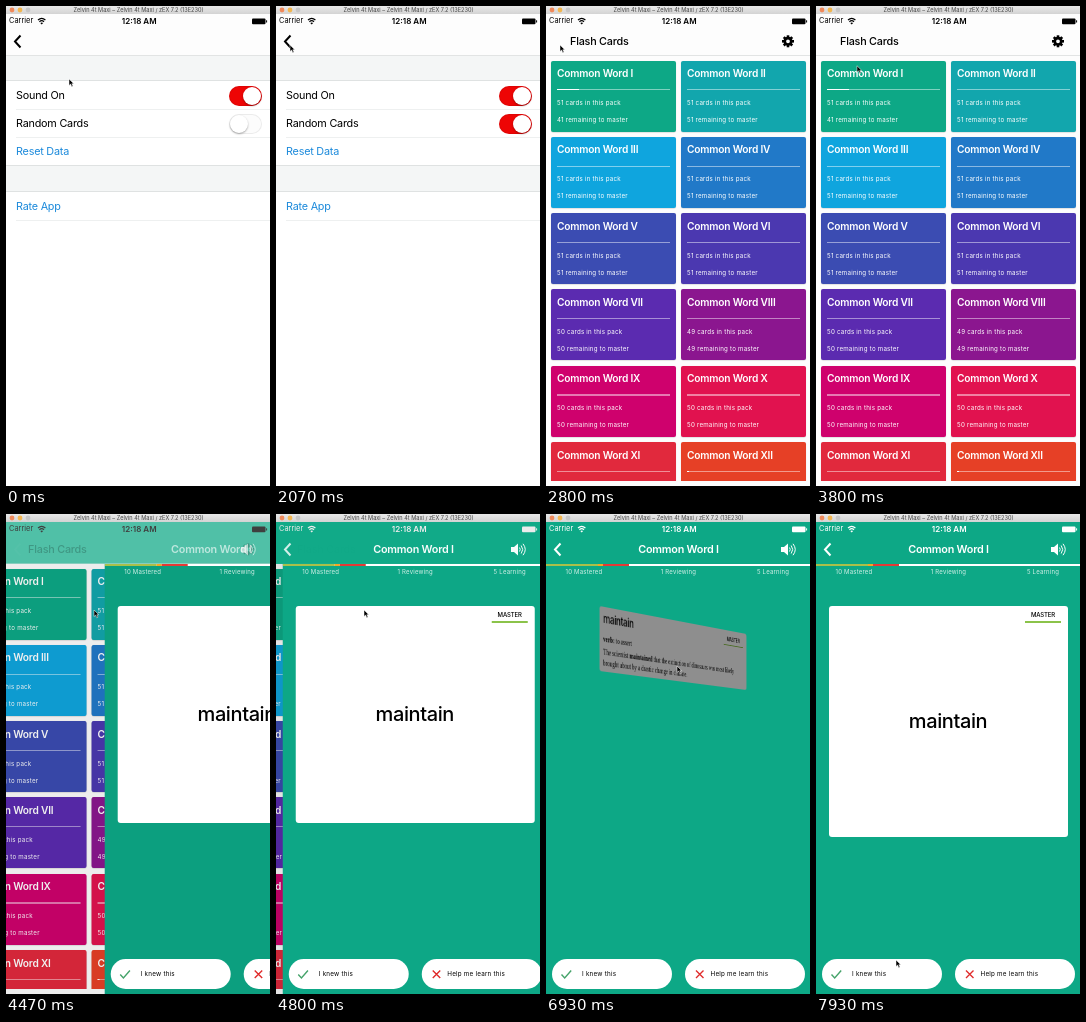
These frames come from a looping animation (264 px wide and 480 px high, 8000 ms). An HTML page:

```html
<!DOCTYPE html>
<html lang="en">
<head>
<meta charset="utf-8">
<title>Flash Cards</title>
<style>
html, body { margin: 0; width: 100%; height: 100%; overflow: hidden; background: #fff; }
#stage { position: relative; width: 264px; height: 480px; overflow: hidden; font-family: Inter, Roboto, sans-serif; color: #000; }
#stage div, #stage svg, b { position: absolute; }
svg { left: 0; top: 0; overflow: visible; fill: none; }
b { font-weight: 400; line-height: 0; white-space: nowrap; letter-spacing: -.02em; }
.mid { transform: translateX(-50%); }
.view { left: 0; top: 0; width: 264px; height: 480px; overflow: hidden; }
.small { letter-spacing: .035em; }
.serif { font-family: "Liberation Serif", serif; letter-spacing: 0; }
#scene { inset: 0; perspective: 1110px; perspective-origin: 132px 294px; }
.face { left: 12.5px; top: 91.5px; width: 239px; background: #fff; border-radius: 3px; }
</style>
</head>
<body>
<div id="stage"></div>
<script>
const TEAL = [13, 168, 134], LINK = '#1c8adb', GREEN = '#8bc34a';
const W = 264, LOOP = 8000;

const text = (x, y, size, s, css = '', cls = '') =>
  `<b class="${cls}" style="left:${x}px;top:${y}px;font-size:${size}px;${css}">${s}</b>`;
const box = (x, y, w, h, bg, css = '', inner = '') =>
  `<div style="left:${x}px;top:${y}px;width:${w}px;height:${h}px;background:${bg};${css}">${inner}</div>`;
const svg = (inner, attrs = '') => `<svg width="264" height="480" ${attrs}>${inner}</svg>`;
const chevron = (id, color) =>
  svg('<path d="M14.5 29.5L9 35.5l5.5 6"/>', `id="${id}" stroke="${color}" stroke-width="2"`);

function settings() {
  const row = (y, s, color) => text(10, y, 10.8, s, `color:${color}`);
  const line = y => box(10, y, 254, 1, '#eef0f0');
  const band = (y, h) => box(0, y, W, h, '#f4f6f6', 'box-sizing:border-box;border:solid #dfe2e2;border-width:1px 0');
  const toggle = (y, id) => box(223, y, 33, 20, '#ee0505', 'border-radius:10px;box-shadow:inset 0 0 0 1px #0001',
    box(14, 1, 18, 18, '#fff', 'border-radius:9px;box-shadow:0 1px 2px #0005')).replace('<div', `<div id="${id}"`);
  return band(49, 26) + band(159, 27) + line(103) + line(131) + line(214) +
    row(90, 'Sound On', '#000') + row(118, 'Random Cards', '#000') +
    row(146, 'Reset Data', LINK) + row(200.5, 'Rate App', LINK) +
    toggle(79.5, 'sound') + toggle(107.5, 'random');
}

function home() {
  const numerals = 'I II III IV V VI VII VIII IX X XI XII'.split(' ');
  const colors = '#0da886 #12a6ad #0fa5de #2179c8 #3b4cb2 #4b38b0 #5b2bb0 #8b168f #cf016d #e1124f #e1293d #e64026'.split(' ');
  const sizes = { 6: 50, 7: 49, 8: 50, 9: 50 };
  const done = { 0: 22, 11: 2 };
  const cards = numerals.map((n, i) => {
    const total = sizes[i] || 51;
    return box(5 + i % 2 * 130, 54.5 + (i >> 1) * 76.3, 125, 71, colors[i], 'border-radius:2px;color:#fff;box-shadow:0 .5px 1px #0003',
      text(6, 12.5, 10.2, 'Common Word ' + n, 'font-weight:600') +
      box(6, 28.8, 113, 1.2, '#ffffff78') + box(6, 28.8, done[i] || 0, 1.2, '#fff') +
      text(6, 42.5, 6.2, total + ' cards in this pack', '', 'small') +
      text(6, 59.5, 6.2, total - (i ? 0 : 10) + ' remaining to master', '', 'small'));
  }).join('');
  return box(0, 0, W, 475, 'none', 'overflow:hidden', cards) +
    '<div id="dim" style="inset:0;background:#000"></div>';
}

function study() {
  const label = (x, s) => text(x, 58, 6, s, 'color:#d3f0e8', 'mid small');
  const pill = (x, inset, s, icon) => box(x, 445, 120, 29.5, '#fff', 'border-radius:15px',
    text(inset, 15.3, 6.3, s, '', 'small') + svg(icon, 'stroke-width="1.4"'));
  const master = text(214.5, 9.5, 6, 'MASTER', 'font-weight:500', 'mid') + box(196.5, 15.7, 36, 1.6, GREEN);
  return box(0, 49.5, W, 2, '#fff') + box(0, 49.5, 52, 2, '#a9c04a') +
    box(52, 49.5, 5, 2, '#f5a623') + box(57, 49.5, 26, 2, '#e53935') +
    label(38, '10 Mastered') + label(132.5, '1 Reviewing') + label(227, '5 Learning') +
    '<div id="scene"><div class="face" id="front">' + master +
    text(119.5, 0, 20, 'maintain', 'top:50%;font-weight:500', 'mid') +
    '</div><div class="face" id="back" style="height:65px">' + master +
    text(5, 11.5, 11.3, 'maintain', 'font-weight:500') +
    text(5, 32.5, 7.2, '<strong>verb:</strong> to assert', '', 'serif') +
    text(5, 45.5, 7.2, 'The scientist <strong>maintained</strong> that the extinction of dinosaurs was most likely', '', 'serif') +
    text(5, 56.5, 7.2, 'brought about by a drastic change in climate.', '', 'serif') +
    '</div></div>' +
    pill(6, 30, 'I knew this', '<path d="M9.5 15.5l3.2 3.5 6.5-7.5" stroke="#45a36a"/>') +
    pill(138.5, 26, 'Help me learn this', '<path d="M11 11.5l7.5 7.5m0-7.5l-7.5 7.5" stroke="#e02c2c"/>');
}

function chrome() {
  const device = 'Zelvin 4t Maxi';
  const teeth = [...Array(8)].map((_, i) => `<path d="M242 29.3v3" transform="rotate(${i * 45} 242 35.3)"/>`).join('');
  return '<div id="nav" style="left:0;top:8px;width:264px;height:42px"></div>' +
    '<div id="rule" style="left:0;top:49px;width:264px;height:1px;background:#e2e4e4"></div>' +
    chevron('backDark', '#000') + chevron('backLight', '#fff') +
    '<div id="homeNav" style="left:0;top:0">' + text(24, 36, 10.8, 'Flash Cards', 'font-weight:500') + '</div>' +
    svg(`<g stroke="#000" stroke-width="2.6">${teeth}<circle cx="242" cy="35.3" r="3.2"/></g>`, 'id="gear"') +
    '<div id="studyNav" style="left:0;top:0;color:#fff">' +
    text(132.5, 36, 10.8, 'Common Word I', 'font-weight:600', 'mid') + '</div>' +
    svg('<path d="M235 33h3l4-3.5v12l-4-3.5h-3z" fill="#fff"/><path d="M243.5 33.5q1.5 2 0 4m1.7-6q3 4 0 8m1.8-9.7q4.5 5.7 0 11.4" stroke="#fff"/>', 'id="speaker"') +
    '<div id="status" style="left:0;top:0">' + text(3, 15.1, 7.4, 'Carrier', 'letter-spacing:0') +
    text(133.2, 15.1, 8, '12:18 AM', 'font-weight:600;letter-spacing:0', 'mid') +
    svg('<path d="M32 14q3.7-3.4 7.4 0m-6 1.7q2.3-2 4.6 0" stroke="currentColor" stroke-width="1.2"/><path d="M34.3 17.1l1.4 1.4 1.4-1.4q-1.4-1-2.8 0z" fill="currentColor"/><rect x="246" y="12.5" width="13.5" height="5.8" rx="1" fill="currentColor"/><path d="M260.6 14.3v2.2" stroke="currentColor"/>') +
    '</div>' +
    box(0, 0, W, 8, 'linear-gradient(#e9e9e9,#d3d3d3)', '',
      svg('<circle cx="6" cy="4" r="2.4" fill="#f08a5c"/><circle cx="14" cy="4" r="2.4" fill="#f3b650"/><circle cx="22" cy="4" r="2.4" fill="#c6c6c6"/>') +
      text(132.5, 4.1, 5.6, `${device} – ${device} / zEX 7.2 (13E230)`, 'color:#444;letter-spacing:0', 'mid')) +
    svg('<path d="M0 0v6.5l1.6-1.4 1.2 2.6 1.2-.6-1.2-2.4h2z" fill="#000" stroke="#fff" stroke-width=".5"/>', 'id="cursor"');
}

const view = (id, bg, inner) => `<div class="view" id="${id}" style="background:${bg}">${inner}</div>`;
document.getElementById('stage').innerHTML = view('home', '#fdfdfd', home()) +
  view('settings', '#fff', settings()) + view('study', `rgb(${TEAL})`, study()) + chrome();

const ui = {};
document.querySelectorAll('#stage [id]').forEach(e => ui[e.id] = e);
const knob = ui.random.firstElementChild;

const ease = (t, start, length) => {
  const k = Math.min(1, Math.max(0, (t - start) / length));
  return (1 - Math.cos(Math.PI * k)) / 2;
};
const slide = (t, start) => t < start ? 0 : t > start + 600 ? 1 : 1 - Math.exp((start - t) / 123);
const shift = (e, x) => e.style.transform = `translateX(${x}px)`;
const fade = (e, a) => e.style.opacity = a;
const mix = (from, to, k) => `rgb(${to.map(c => Math.round(from + (c - from) * k))})`;

// Pointer moves: start, length, x, y
const moves = [[70, 700, 238, 118], [1130, 570, 14, 39], [3500, 730, 88, 96], [5050, 600, 131, 152], [7350, 520, 80, 446]];

function pointer(t) {
  let x = 63, y = 73;
  for (const [start, length, toX, toY] of moves) {
    const k = ease(t, start, length);
    x += (toX - x) * k;
    y += (toY - y) * k;
  }
  ui.cursor.style.transform = `translate(${x}px,${y}px)`;
}

function turnFace(face, angle, visible) {
  const depth = Math.abs(Math.sin(angle * Math.PI / 180));
  const flat = depth < 1e-4;
  face.style.display = visible ? '' : 'none';
  face.style.transform = flat ? 'none' : `translateZ(${-119.5 * depth}px) rotateY(${angle}deg)`;
  face.style.filter = flat ? 'none' : `brightness(${1 - .59 * depth})`;
}

function draw(now) {
  const t = now % LOOP;
  const pop = slide(t, 2150), push = slide(t, 4350), on = ease(t, 850, 250);
  const homeShown = pop * (1 - push) ** 1.6;

  shift(knob, -13 * (1 - on));
  ui.random.style.background = mix(252, [238, 5, 5], on);

  shift(ui.settings, W * pop);
  shift(ui.home, -79 * (1 - pop + push));
  shift(ui.study, W * (1 - push));
  ui.study.style.background = mix(0, TEAL, 1 - .14 * (1 - push));
  fade(ui.dim, .1 * (1 - pop + push));

  ui.nav.style.background = mix(253, TEAL, push ** .7);
  ui.status.style.color = mix(0, [255, 255, 255], push ** 3);
  fade(ui.rule, 1 - push);
  fade(ui.backDark, 1 - pop);
  fade(ui.backLight, push ** 8);
  fade(ui.homeNav, homeShown);
  shift(ui.homeNav, -3 * push - 20 * (1 - pop));
  fade(ui.gear, homeShown);
  fade(ui.studyNav, push);
  shift(ui.studyNav, 195 * (1 - push));
  fade(ui.speaker, push);

  const turn = 180 * (ease(t, 6757, 500) - ease(t, 5930, 500));
  const frontUp = turn > -90;
  ui.front.style.height = (t > 6500 ? 231 : 217) + 'px';
  turnFace(ui.front, turn, frontUp);
  turnFace(ui.back, turn + 180, !frontUp);

  pointer(t);
  requestAnimationFrame(() => draw(performance.now()));
}
draw(performance.now());
</script>
</body>
</html>
```
